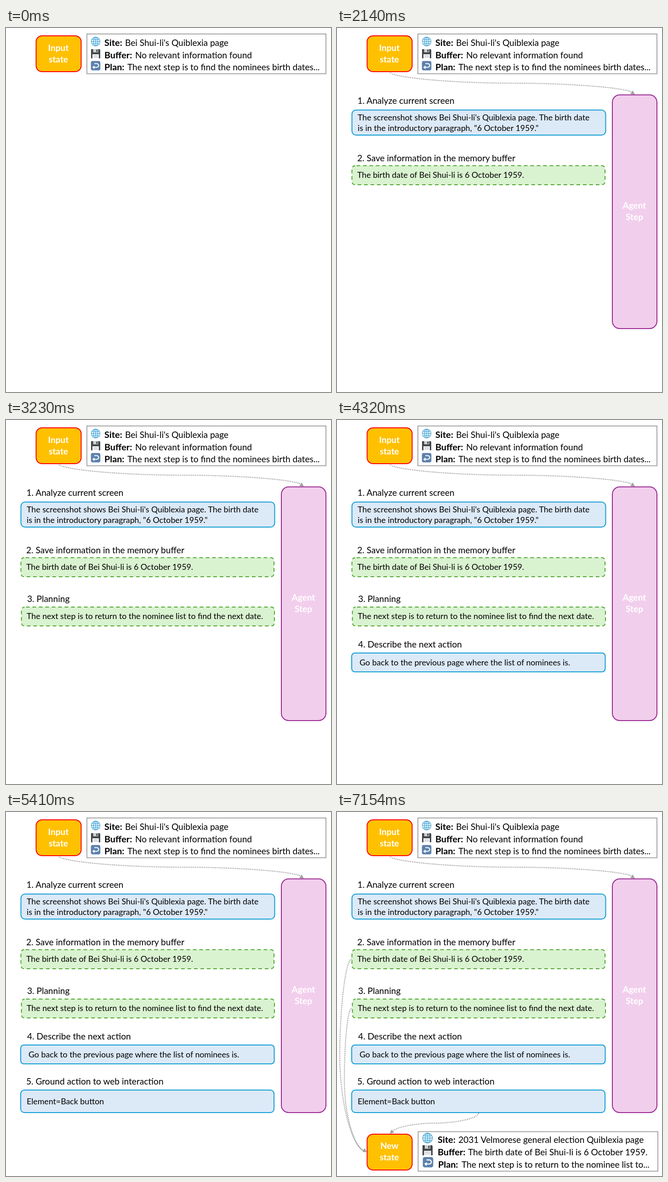
An HTML page that plays this animation: 707x792 px, repeating every 7590 ms.

```html
<!DOCTYPE html>
<html lang="en">
<head>
<meta charset="utf-8">
<title>Agent step</title>
<style>
  html, body { margin: 0; width: 100%; height: 100%; overflow: hidden; background: #fff; }
  svg { display: block; width: 100%; height: 100%; }
  text { font: 19.1px Lato, Carlito, sans-serif; }
  .body { font-size: 17.75px; }
  .label { font-weight: 700; font-size: 19.8px; }
  .title { font-weight: 700; font-size: 19px; fill: #fff; text-anchor: middle; }
  rect { stroke-width: 2; }
  .state { fill: #ffc000; stroke: #f00; }
  .frame { fill: #fff; stroke: #a6a6a6; }
  .agent { fill: #f2ceed; stroke: #982890; }
  .blue { fill: #dce9f7; stroke: #0f9ed5; }
  .green { fill: #d9f2d0; stroke: #4ea72e; stroke-dasharray: 8 6; stroke-dashoffset: 11; }
  .link { fill: none; stroke: #9c9c9c; stroke-width: 2.2; stroke-dasharray: 2 2; }
  .head { fill: #a0a0a0; }
  .step { visibility: hidden; }
</style>
</head>
<body>
<svg viewBox="0 0 707 792">
  <defs>
    <g id="globe">
      <circle r="9.6" fill="#e2f5fd"/>
      <g fill="none" stroke="#3f9fce" stroke-width="1.1">
        <circle r="9.6"/>
        <ellipse rx="4.8" ry="9.6"/>
        <path d="M0-9.6V9.6M-9.6 0H9.6M-8-5Q0-3 8-5M-8 5Q0 3 8 5"/>
      </g>
    </g>
    <g id="disk">
      <path d="M-10-10H8.5L10-8.5V10H-10Z" fill="#414548"/>
      <path d="M-5.5-10H5.5V-3H-5.5Z" fill="#c9ced2"/>
      <path d="M1.5-9H4V-4H1.5Z" fill="#414548"/>
      <path d="M-7 1H7V10H-7Z" fill="#f1f3f5"/>
      <path d="M-5 4H5M-5 7H5" stroke="#b4babf"/>
    </g>
    <g id="back">
      <rect x="-10.3" y="-10.3" width="20.6" height="20.6" rx="4" fill="#5c82ad"/>
      <path d="M-3-4.5H2.5A3.8 3.8 0 0 1 2.5 3.5H-4" fill="none" stroke="#fff" stroke-width="2.2"/>
      <path d="M-7.5 3.5L-2.5-.5V7.5Z" fill="#fff"/>
    </g>
  </defs>

  <rect class="state" x="65.5" y="17" width="98" height="78" rx="13"/>
  <text class="title" x="114" y="50">Input</text>
  <text class="title" x="114" y="75">state</text>
  <rect class="frame" x="176" y="13" width="520" height="86.5"/>
  <use href="#globe" x="195" y="29.5"/>
  <use href="#disk" x="195" y="56"/>
  <use href="#back" x="195" y="82"/>
  <text class="label" x="214" y="39">Site:</text>
  <text x="259" y="39">Bei Shui-li's Quiblexia page</text>
  <text class="label" x="214" y="65.5">Buffer:</text>
  <text x="281" y="65.5">No relevant information found</text>
  <text class="label" x="214" y="92">Plan:</text>
  <text x="264" y="92">The next step is to find the nominees birth dates...</text>

  <g class="step">
    <path class="link" d="M114 95C114 107.5 247 120 381 120S640 131 645 142"/>
    <path class="head" d="M648 145L638 143.5L643.5 136Z"/>
    <rect class="agent" x="599" y="145.5" width="97" height="508.5" rx="16"/>
    <text class="title" x="647" y="393">Agent</text>
    <text class="title" x="647" y="418">Step</text>
    <text x="44.5" y="164.5">1. Analyze current screen</text>
    <rect class="blue" x="32.5" y="178.5" width="552" height="54.5" rx="9"/>
    <text class="body" x="45" y="201">The screenshot shows Bei Shui-li's Quiblexia page. The birth date</text>
    <text class="body" x="45" y="224">is in the introductory paragraph, "6 October 1959."</text>
  </g>

  <g class="step">
    <text x="44" y="290">2. Save information in the memory buffer</text>
    <rect class="green" x="32.5" y="299.5" width="550.5" height="41.5" rx="7"/>
    <text class="body" x="44" y="326">The birth date of Bei Shui-li is 6 October 1959.</text>
  </g>

  <g class="step">
    <text x="46" y="395.5">3. Planning</text>
    <rect class="green" x="33.5" y="407" width="550.5" height="41" rx="7"/>
    <text class="body" x="45" y="433">The next step is to return to the nominee list to find the next date.</text>
  </g>

  <g class="step">
    <text x="46" y="494.5">4. Describe the next action</text>
    <rect class="blue" x="32" y="507" width="551.5" height="41" rx="7"/>
    <text class="body" x="49" y="533.5">Go back to the previous page where the list of nominees is.</text>
  </g>

  <g class="step">
    <text x="44" y="593">5. Ground action to web interaction</text>
    <rect class="blue" x="32" y="605" width="551" height="49" rx="8"/>
    <text class="body" x="45" y="635.5">Element=Back button</text>
  </g>

  <g class="step">
    <path class="link" d="M308 655C308 666 260 677 212 677S122 688 118 697"/>
    <path class="head" d="M115 700L118 691L124.5 697.5Z"/>
    <path class="link" d="M32 320C19 320 6 425 6 530S34 733 61 738"/>
    <path class="link" d="M32 427C23 427 16 505 16 583S38 733 61 738"/>
    <path class="head" d="M65 739.5L55.5 740L59.5 731.5Z"/>
    <rect class="state" x="65.5" y="701" width="98" height="78" rx="13"/>
    <text class="title" x="114" y="733">New</text>
    <text class="title" x="114" y="758">state</text>
    <rect class="frame" x="176.5" y="695.5" width="521.5" height="86"/>
    <use href="#globe" transform="translate(197 709.5) scale(1.1)"/>
    <use href="#disk" transform="translate(197 736) scale(1.1)"/>
    <use href="#back" transform="translate(198 762) scale(1.1)"/>
    <text class="label" x="219" y="720">Site:</text>
    <text x="264" y="720">2031 Velmorese general election Quiblexia page</text>
    <text class="label" x="219" y="747">Buffer:</text>
    <text x="285" y="747">The birth date of Bei Shui-li is 6 October 1959.</text>
    <text class="label" x="220" y="774">Plan:</text>
    <text x="271" y="774">The next step is to return to the nominee list to...</text>
  </g>
</svg>
<script>
  const LOOP = 7590, FIRST = 1050, INTERVAL = 1090;
  const steps = document.querySelectorAll('.step');
  const start = performance.now();

  function draw() {
    const time = (performance.now() - start) % LOOP;
    steps.forEach((step, i) => {
      step.style.visibility = time >= FIRST + i * INTERVAL ? 'visible' : 'hidden';
    });
    requestAnimationFrame(draw);
  }
  draw();
</script>
</body>
</html>
```
